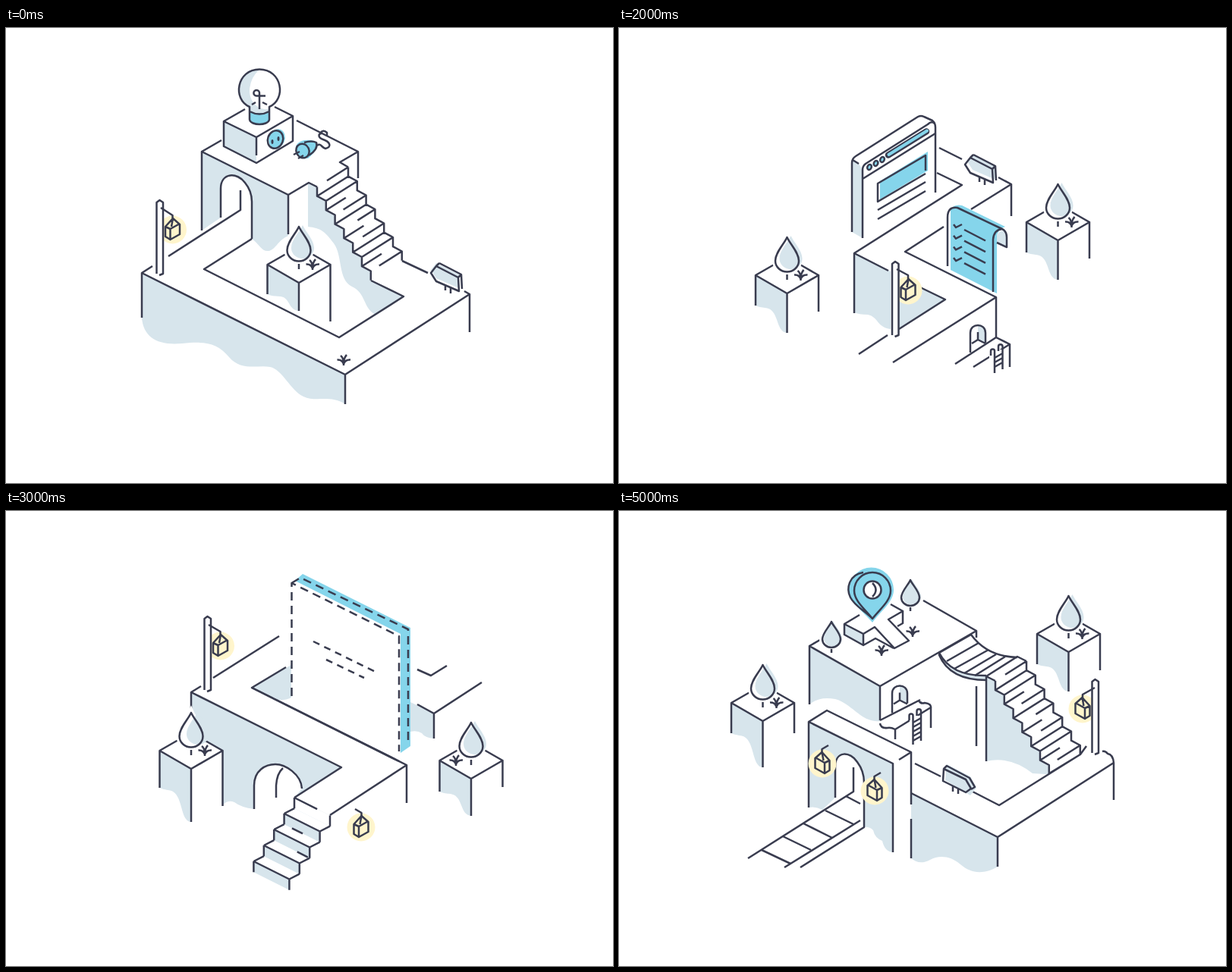
These frames come from a looping animation (800x600 px, 6000 ms). An HTML page:

```html
<!DOCTYPE html>
<html lang="en">
<head>
<meta charset="utf-8">
<title>Isometric steps</title>
<style>
html, body { margin: 0; width: 100%; height: 100%; overflow: hidden; background: #fff; }
svg { display: block; width: 100vw; height: 100vh; }
.ln { fill: none; stroke: #393c4f; stroke-width: 2.5; stroke-linejoin: round; }
.dash { stroke-dasharray: 11 7; }
.pale { fill: #d7e5ec; }
.cyan { fill: #85d5eb; }
.glow { fill: #fff5cc; }
.white { fill: #fff; }
.halo { fill: #fff; stroke: #fff; stroke-width: 8; }
.dark { fill: #393c4f; }
</style>
</head>
<body>
<svg id="stage" viewBox="0 0 800 600"></svg>
<script>
const path = (cls, d) => `<path class="${cls}" d="${d}"/>`;
const ln = d => path('ln', d);
const dash = d => path('ln dash', d);
const pale = d => path('pale', d);
const cyan = d => path('cyan', d);
const white = d => path('white', d);
const oval = (cls, x, y, rx, ry = rx, turn = 0) =>
  `<ellipse class="${cls}" cx="${x}" cy="${y}" rx="${rx}" ry="${ry}" transform="rotate(${turn} ${x} ${y})"/>`;
const at = (x, y, body, more = '') => `<g transform="translate(${x} ${y})${more}">${body}</g>`;
const times = (n, fn) => Array.from({ length: n }, (_, i) => fn(i)).join('');

const DROP = 'M0 0C-4 9-15.5 20-15.5 31A15.5 14.5 0 0 0 15.5 31C15.5 20 4 9 0 0Z';
const drop = (x, y, shift = 5) => at(x, y,
  path('halo', DROP) + at(shift, -2, pale(DROP), ' scale(.97)') + ln(DROP + 'M0 49V56'));

const smallDrop = (x, y) => {
  const d = 'M0 0C-3 7-12 15-12 23A12 11 0 0 0 12 23C12 15 3 7 0 0Z';
  return at(x, y, path('halo', d) + at(2, -1, pale(d)) + ln(d + 'M0 36V41'));
};

const grass = (x, y) => at(x, y, ln('M-8.5 .5Q-2 0 0 6Q2 0 9 .5M-4-5Q0-2 0 6Q0-2 4-6M0 4V8'));

// Column with a drop tree; l, m, r are the lower ends of its edges.
const pillar = (x, y, l, m, r, side = 18, shift = 5) => at(x, y,
  white(`M-41.5 50L0 26 41.5 50V${r}L0 ${m}V74Z`) +
  pale(`M-41.5 50V${l}C-31 ${l + 5}-23 ${l}-17 ${l + (m - l) * .3}S-11 ${m - 1} 0 ${m}V74Z`) +
  ln(`M-18 36.5L-41.5 50V${l}M-41.5 50L0 74V${m}M0 74L41.5 50V${r}M41.5 50L18 36.5`)) +
  drop(x, y, shift) + grass(x + side, y + 49);

const lantern = (x, y, flip = 1, hook = true) => at(x, y,
  oval('glow', 0, 1, 18.5) +
  ln('M.5-14L-9.5-3V10L-3 14 9.5 7V-6ZM-9.5-3L-3 0 9.5-7M-3 0V14M.5-14L-1.5-3') +
  (hook ? ln('M-8-23L.5-18V-13') : ''), ` scale(${flip} 1)`);

const post = (x, y) => at(x, y, white('M0 3L4 0 8.5 3V98H0Z') + ln('M0 97V3L4 0 8.5 3V97L3.5 99'));

const ladder = (x, y, h) => at(x, y,
  ln(`M-5 6V0A2.5 2.5 0 0 1 0 0V${h}M5 0V-6A2.5 2.5 0 0 1 10.5-6V${h - 5}` +
    times(Math.floor((h - 6) / 6), i => `M0 ${9 + i * 6}L10.5 ${3 + i * 6}`)));

const sign = (x, y, shift) => at(x, y,
  at(shift, -4, pale('M0 10L7 1 37 16V34L7 21Z')) +
  ln('M0 10L7 1 36 16 37 34 7 21ZM11-3L40 12 41 31M7 1L11-3M36 16L40 12M19 27V33M26 30V37'));

const balloon = (x, y) => {
  const d = 'M0 0C-15 0-24 11-24 25C-24 42-9 60 0 60S24 42 24 25C24 11 15 0 0 0Z';
  return at(x, y, at(4.5, -4, cyan(d)) + white('M-23 20Q-21 46 0 59Q-15 43-18 22Z') +
    ln(d + 'M-2 64L-3.5 68.5H3.5L2 64M0 73V94'));
};

// Flight going down to the right; (x, y) is the first nose on the near side.
const ZIG = 'v12.2l11.8 6.3'.repeat(6) + 'v12.2';
const flight = (x, y) => white(`M${x} ${y}${ZIG}l41-26L${x + 41} ${y - 26}Z`) +
  ln(`M${x} ${y}${ZIG}M${x + 41} ${y - 26}${ZIG}` +
    times(7, i => {
      const nx = x + 11.8 * i, ny = y + 18.5 * i, a = [13, 0, 11, 18][i % 4];
      return `M${nx + a} ${ny - a * .634}L${nx + 41} ${ny - 26}` +
        (i < 6 ? `M${nx} ${ny + 12.2}l${i % 2 ? 26 : 41} ${i % 2 ? -16.5 : -26}` : '');
    }));

// Flight going down to the left: step (-dx, dy), riser h, width (w, w / 2).
const descent = (x, y, dx, dy, h, w) => times(5, i => {
  const nx = x - dx * i, ny = y + dy * i, v = w / 2;
  const riser = `M${nx} ${ny}l${w} ${v}v${h}l${-w} ${-v}Z`;
  const tread = i < 4 ? `M${nx} ${ny + h}l${-dx} ${dy - h}M${nx + w} ${ny + v + h}l${-dx} ${dy - h}` : '';
  const cut = [0, .22, .65, 0][i];
  return pale(riser) + (i ? '' : white(`M${nx} ${ny}l${w} ${v}v${h}l${-w} ${-v}Z`)) +
    ln(`M${nx} ${ny}v${h}M${nx + w} ${ny + v}v${h}M${nx} ${ny}l${w * (i ? 1 : .64)} ${v * (i ? 1 : .64)}` +
      tread + (cut ? `M${nx + w * cut} ${ny + h + v * cut}l${w * .3} ${v * .3}` : ''));
});

const door = (x, y) => at(x, y,
  pale('M10 1C18 2 20 6 20 12V23L10 18Z') +
  ln('M0 36V10C0-3.5 20-3.5 20 10V23M10 9V19L2 24M10 19L20 24'));

const bulb = () =>
  oval('white', 334, 81, 26.5) +
  pale('M334 55C312 55 300 77 312 95Q320 103 321 112H347V107C334 109 320 99 321 80Q323 64 334 55Z') +
  cyan('M322 112H347V121C345 129 324 129 322 121Z') +
  ln('M321 121V104C298 94 304 54.5 334 54.5S370 94 347 104V121C345 129 323 129 321 121M321 110Q334 117 347 110') +
  ln('M334 107V86A3.8 3.8 0 1 0 330 89.5H342M324 101L329 98M338 98L344 101');

const outlet = () =>
  oval('cyan', 357, 146, 10.5, 13, 20) + oval('ln', 355, 147, 10, 12, 20) +
  oval('dark', 351, 150, 1.5, 3) + oval('dark', 359, 146, 1.5, 3);

const plug = () =>
  cyan('M382 157C383 147 402 145 410 151Q412 160 398 172Q383 171 382 157Z') +
  oval('ln', 391, 162, 8.5, 9.5, -25) +
  ln('M393 151Q403 148 409 151Q412 160 399 168M379 167L387 163M385 172L392 168') +
  ln('M410 155C415 151 416 158 421 159C430 157 427 150 418 147C410 144 412 139 416 139M414 139Q418 133 423 138V142');

const first = () =>
  pale('M179 323V382C181 408 200 419 232 416S278 415 294 434S332 444 348 447S375 478 392 486S426 483 447 496V457Z') +
  pale('M258 163V267L283 250V212C283 190 305 190 315 204Q324 215 324 229V278C335 286 337 295 346 294S358 280 372 274V220Z') +
  pale(`M398 204L410 209.5${ZIG}L524 354 487 378C470 369 475 350 456 341S444 300 432 284S415 264 398 262Z`) +
  ln('M193 314L179 323V382M179 323L447 457V496M447 457L611 351V401M611 351L604 347M522 307L556 323') +
  ln('M214 301L309 240V214M324 278L261 318 439 408 524 354 481 333') +
  ln('M283 250V212C283 190 305 190 315 204Q324 215 324 229V278') +
  ln('M258 267V163L372 220V272M258 163L284 148M372 220L399 204 410 209.5M383 122L464 163V198M464 163L440 177 451 183.5') +
  flight(410, 209.5) +
  pale('M287 123L330 144V178L287 156Z') +
  ln('M315 107L287 123V156L330 178 378 149V116L354 104M287 123L330 144V168M330 144L378 116') +
  bulb() + outlet() + plug() +
  pillar(386, 262, 89, 111, 125) + grass(445, 437) +
  lantern(219.5, 265, 1, false) + post(198.5, 227) + ln('M204 237L219.5 247V251') +
  sign(560, 313, 0);

const second = () =>
  pale('M181 331V388C181 405 198 412 216 409C250 404 260 436 274 457Q284 472 295 472V388Z') +
  pale('M385 413V440C401 443 401 463 419 474Q442 483 453 469V447Z') +
  pale('M404 342C416 344 422 356 422 372V389L404 380Z') +
  ln('M181 331L295 388V468M295 388L439 297V325M223 311L297 347 404 279 439 297') +
  ln('M453 469V447L385 413V372C385 333 422 333 422 372V389M453 447L618 342V385M618 342L583 324M404 356V381L455 406 561 338') +
  pale('M440 252L475 271V349C463 348 464 334 455 331Q447 329 444 323V297Q466 292 468 273Z') +
  white('M444 262L468 275Q464 291 438 293L417 278Q438 277 444 262Z') +
  ln('M440 264V252L472 233.5 507 251V259M440 252L475 271V349M475 271L507 251') + grass(474, 247) +
  ln('M444 262C440 273 429 278 417 278M468 273C466 286 455 293 438 292M468 273V279Q462 294 440 297') +
  ln('M420 279L441 291M429 276L451 288M437 270L460 282M444 263L468 275') +
  ln('M504 260C509 271 521 276 534 275M482 272C486 285 499 291 515 289M482 272V277Q488 291 508 294') +
  ln('M485 279L506 265M492 285L515 270M502 288L525 274') +
  pale('M516 291L551 309V336C543 334 541 342 530 340Q521 340 516 347Z') +
  ln('M516 352V291L548 271 583 289V318M516 291L551 309V336M551 309L583 289') +
  white('M562 295H580V341H562Z') + ladder(566, 296, 44) +
  cyan('M282 214L384 151 397 158 296 222V328L282 322Z') +
  dash('M284 322V215L384 152 397 158M284 322L296 328M296 328V221L397 158V265ZM309 291L335 257 356 265 382 212') +
  `<ellipse class="ln dash" cx="339" cy="229.5" rx="12.5" ry="14.5"/>` +
  balloon(283.5, 115) + balloon(384.5, 50) +
  lantern(368.5, 391) + lantern(437.5, 351) +
  pillar(357.5, 416, 66, 91, 66, -20);

const third = () =>
  pale('M310 297L358 321V397C340 395 342 381 328 378Q316 378 310 375Z') +
  pale('M369 342L395 341 430 358 369 397Z') +
  ln('M422 158L452 173M419 191L452 207 310 297V376M310 297L355 320M500 197L517 206V248M517 206L464 239') +
  ln('M428 262L377 295 497 355V408M497 355L361 441M354 405L316 430M395 341L430 358 369 397') +
  white('M307 178L398 115 417 126V217L321 277Z') +
  pale('M307 174L316 179 321 187V277L307 269Z') +
  ln('M307 269V178Q307 172 312 169L394 117Q398 115 402 117L413 122Q417 125 417 131V217') +
  ln('M321 277V187Q321 182 325 179L407 127Q412 122 416 126M308 174L316 179M321 199L417 139') +
  times(3, i => oval('cyan', 331 + i * 8.5, 183 - i * 5, 3, 4, 20) + oval('ln', 330 + i * 8.5, 183.5 - i * 5, 2.7, 3.6, 20)) +
  `<g stroke-linecap="round"><path d="M355 167.5L405 136.5" stroke="#393c4f" stroke-width="8.5"/>` +
  `<path d="M355.5 167L406 135.5" stroke="#85d5eb" stroke-width="4"/></g>` +
  cyan('M344 202L407 163V188L344 226Z') +
  ln('M404 188V168L341 205V229L404 192M341 240L404 203M341 252L404 215') +
  sign(456, 170, 3) +
  cyan('M437 240Q441 232 452 234L509 262Q498 265 498 277V350L437 319Z') +
  pale('M498 274Q502 266 507 268Q511 272 511 289L498 283Z') +
  ln('M433 314V250Q433 235 446 237L505 265Q511 268 511 276V289L498 283M493 348V279Q494 266 505 265') +
  times(4, i => ln(`M441 ${259 + i * 14.7}L444 ${263 + i * 14.7} 452 ${259 + i * 14.7}M455 ${266 + i * 14.7}L483 ${280.5 + i * 14.7}`)) +
  lantern(381, 345, 1, false) + post(360, 308) + ln('M366 318L381 326V331') +
  ln('M443 443L497 408 515 417V447M467 447L515 417') + door(463, 392) +
  white('M488 424H508V455H488Z') + ladder(495, 426, 29) +
  pillar(221.5, 276, 90, 126, 98) + pillar(578.5, 206, 90, 126, 98);

const fourth = () =>
  pale('M244 239L442 338 380 378 390 366C389 347 372 334 355 334S327 342 327 362V393Q310 391 301 384Q291 380 285 389L244 340Z') +
  pale('M324 233L376 203V246Q363 252 354 247Z') +
  pale('M533 252L564 267V300Q552 299 548 293Q542 289 533 291Z') +
  ln('M360 165L273 220M257 231L244 239V264M244 239L442 338 380 378M369 206L324 233 528 335V385M528 335L427 401') +
  ln('M327 393V362C327 342 342 334 355 334S389 347 390 366M356 378V362Q357 346 365 339') +
  ln('M542 209L560 217 581 204M627 226L564 267V300M564 267L542 255') +
  white('M376.5 95L388 88 530 156V312L518 317 376.5 246Z') +
  pale('M376 203V244L364 249 354 247 340 233Z') + white('M377.5 95H518V316L377.5 245Z') +
  ln('M324 233L518 330') +
  cyan('M381 92L391 83 533 154V310L520 319V162Z') +
  dash('M376.5 244V95L518 165V317M376.5 95L388 88 530 156V308') +
  `<path class="ln" stroke-dasharray="9 7" d="M405 172L489 213M422 196L472 220"/>` +
  descent(380, 378, 13.4, 21, 14.2, 47) +
  lantern(282.5, 177, 1, false) + post(261.5, 139) + ln('M267 150L282.5 159V163') +
  lantern(468, 416) +
  pillar(244, 266, 99, 144, 123, 18, 9) + pillar(613, 279, 91, 123, 85, -20);

const fifth = () =>
  pale('M301 280L344 302 332 308 320 325Q308 316 301 300Z') +
  pale('M385 322L415 337V406C405 402 398 411 385 403Z') +
  pale('M533 231V276Q520 276 516 264Q512 257 506 257Q523 248 526 229Z') + pale('M472 201L483 207 472 213Z') +
  ln('M375 234L301 280V299M301 280L344 302 332 308M301 337V354M373 328L385 322 415 337V406M415 337L506 280V326M506 280L444 248') +
  ln('M503 181L472 200V211M472 200L533 231 568 209M533 231V276') +
  white('M484 208Q470 232 441 237L474 262Q516 260 525 229Z') +
  ln('M484 208Q470 234 441 237M525 228Q517 260 474 262M525 228V236Q512 264 474 265') +
  ln('M441 237L486 260M451 234L496 255M462 228L505 249M474 220L515 241') +
  white('M354 263L400 235 454 266V282L414 307 354 278Z') + pale('M354 263L414 291V307L354 278Z') +
  ln('M380 247L354 263V278L414 307 454 282V266L440 259M354 263L414 291V307M414 291L454 266') +
  oval('cyan', 406.5, 245.5, 30) + white('M378 234Q374 258 391 269Q374 251 381 230Z') +
  oval('ln', 402, 246, 26.5) +
  ln('M409 217.5C438 218 445 251 423 267M391 248L397 255 412 235') +
  oval('glow', 304, 322, 18.5) +
  descent(332, 307.5, 12, 18.7, 12.4, 41) +
  grass(320, 279) + grass(414, 322) +
  lantern(305, 322, -1) + lantern(392, 364, -1) +
  pillar(266.5, 188, 90, 126, 70) + pillar(533, 308, 90, 126, 98);

const pin = () =>
  cyan('M334 147C322 133 303 119 303 104A29.5 29.5 0 0 1 362 104C362 120 345 132 334 147Z') +
  ln('M334 142C325 130 310 119 310 105A24 24 0 0 1 358 105C358 119 343 130 334 142ZM322 81C303 84 299 102 305 114C311 126 325 132 334 142') +
  oval('white', 334, 104, 11.5) + oval('ln', 334, 104, 11.5) + ln('M334 95Q343 104 334 113');

const sixth = () =>
  pale('M251 178L344 231V277C320 280 306 253 285 248Q264 244 251 255Z') +
  ln('M251 255V178L344 231V276M251 178L270 167M344 231L471 158V167M401 118L471 158M471 231V310') +
  pale('M297 149L322 162V177L297 163Z') +
  ln('M317 137L297 149V163L322 177 338 168 362 181M297 149L322 162V177M322 162L337 153 363 181 382 171 355 143 374 132V148L367 152M374 132L358 123') +
  pin() + smallDrop(384, 91) + smallDrop(280, 146) + grass(387, 158) + grass(346, 183) +
  white('M464 163Q485 192 525 193L484 218Q438 216 422 187Z') +
  pale('M422 187Q438 218 484 217V223Q436 222 422 187Z') +
  ln('M464 163Q485 192 525 193M422 187Q438 218 484 217M422 187V190Q436 223 484 223') +
  ln('M422 187L464 163M432 198L474 174M442 208L487 183M455 214L497 189M469 217L509 192') +
  pale(`M484 218L496 224${ZIG}L545 346Q516 323 484 330Z`) +
  ln('M484 330V218L496 224M484 218L525 192 537 198') + flight(496, 224) +
  pale('M385 372L499 430V469C480 480 464 478 450 466S421 454 410 460S391 463 385 458Z') +
  ln('M390 333L424 350M466 370L501 388 608 321M567 346L608 321 616 310M385 372L499 430V469M499 430L652 332V381M637 317Q641 316 644 320Q651 321 652 332') +
  white('M250 278L274 263 385 318V387L361 450Z') +
  pale('M250 278L361 333V450Q350 449 347 435Q337 431 335 421Q330 416 323 417V358C323 333 302 313 290 323Q285 326 285 338V378L268 394Q259 389 250 391Z') +
  ln('M250 391V278L274 263 385 318V387M250 278L361 333V450M369 328L385 318M385 406V458') +
  ln('M285 378V338C285 315 305 317 314 331Q323 343 323 358V417L239 470M309 338V370L170 458M318 408L218 470') +
  ln('M299 376L318 386M272 395L309 413M243 412L281 431M216 429L253 447M188 447L226 465') +
  ln('M344 276L397 249M344 280Q345 287 354 286Q358 285 364 288L411 259M364 288V301M395 250Q398 255 403 253Q412 254 411 260V286') +
  door(360, 230.5) + white('M383 270H400V308H383Z') + ladder(387.5, 270, 38) +
  pale('M432 334L463 350 471 365 463 375 430 355Z') +
  ln('M428 340L427 356 457 371 464 366 457 354ZM428 340L432 336 462 352 469 364 464 367M440 363V370M447 366V373') +
  lantern(268, 332, -1) + lantern(337, 368, -1) +
  lantern(611, 260, -1, false) + post(623.5, 222) + ln('M627 233L611 242V247') +
  pillar(189.5, 203, 90, 135, 90) + pillar(592.5, 112, 90, 126, 98);

const stage = document.getElementById('stage');
const scenes = [first, second, third, fourth, fifth, sixth];
stage.innerHTML = scenes.map(draw => `<g display="none">${draw()}</g>`).join('');
const groups = [...stage.children];

function show(ms) {
  const now = Math.floor(ms / 1000) % scenes.length;
  groups.forEach((g, i) => g.setAttribute('display', i === now ? 'inline' : 'none'));
}

const start = performance.now();
function tick() {
  show(performance.now() - start);
  requestAnimationFrame(tick);
}
tick();
</script>
</body>
</html>
```
